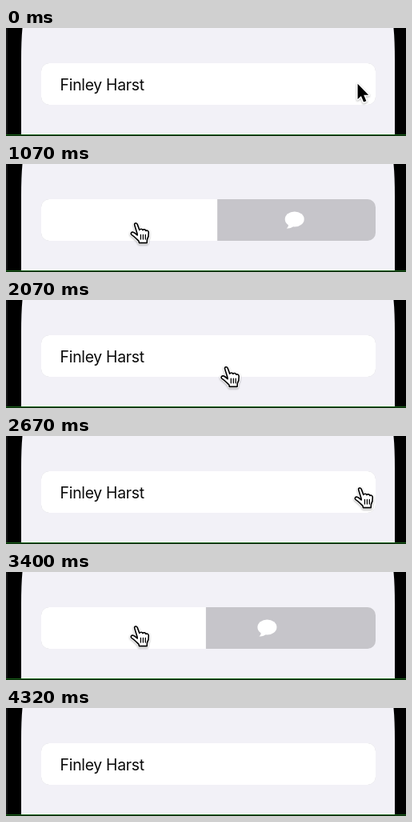
An HTML page that plays this animation: 500 px wide and 135 px high, repeating every 4440 ms.

```html
<!DOCTYPE html>
<html lang="en">
<head>
<meta charset="utf-8">
<title>Swipe action</title>
<style>
  html, body { margin: 0; width: 100%; height: 100%; overflow: hidden; background: #f2f1f7; }
  svg { display: block; width: 500px; height: 135px; }
  text { font: 400 19.4px Inter, "Liberation Sans", sans-serif; letter-spacing: -.3px; fill: #0a0a0a; }
  .halo { fill: none; stroke: #fff; stroke-linejoin: round; }
  .ink { fill: #fff; stroke: #000; stroke-width: 1.6; stroke-linejoin: round; stroke-linecap: round; }
  .creases { stroke-width: 1.3; }
  #cursor { filter: drop-shadow(0 1px 1px rgba(0, 0, 0, .3)); }
</style>
</head>
<body>
<svg viewBox="0 0 500 135">
  <defs>
    <clipPath id="card"><rect x="44" y="44" width="418" height="52" rx="10"/></clipPath>
    <path id="handShape" d="M10 15 L6.8 4.8 C5.9 1.9 9.2 .9 10.3 3.6 L12.8 10.4 C13.5 9 16.2 8.8 17 10.6 C17.9 9.3 20.3 9.6 20.9 11.5 C22.2 10.6 24.3 11.4 24.3 13.8 C24.5 18 24 20 22.4 22.5 L22.2 26.6 H12.4 L12 24.3 C9.5 22.3 7 19 3.2 16.6 C1 15 2.9 12.5 5.5 13.4 C7.2 14 8.3 15.2 10.2 17 Z"/>
    <path id="arrowShape" d="M5.6 6.8 V26 L9.9 22 L13.1 29.6 L16.4 28.2 L13.2 20.8 H19.2 Z"/>
  </defs>

  <rect width="500" height="135" fill="#f2f1f7"/>
  <path d="M0 0H20.5Q19 16 19 40V135H0ZM500 0H484.5Q486 16 486 40V135H500Z"/>
  <rect width="2" height="135" fill="#161617"/>
  <rect y="133" width="500" height="1" fill="#1c661c"/>
  <rect y="134" width="500" height="1" fill="#062406"/>

  <g clip-path="url(#card)">
    <rect x="44" y="44" width="418" height="52" fill="#c6c5ca"/>
    <g id="icon" fill="#fff">
      <ellipse cy="-1" rx="12" ry="9.6"/>
      <path d="M-8 4 Q-7 8.5 -10 10.5 Q-4.5 11 -1 7.5 Z"/>
    </g>
    <g id="row">
      <rect x="44" y="44" width="418" height="52" fill="#fff"/>
      <text x="67.6" y="78">Finley Harst</text>
    </g>
  </g>

  <g id="cursor">
    <g id="hand">
      <use href="#handShape" class="halo" stroke-width="3.6"/>
      <use href="#handShape" class="ink"/>
      <path class="ink creases" d="M14.4 16.5v5.5M17.4 16.5v5.5M20.3 16.5v5.5"/>
    </g>
    <g id="arrow">
      <use href="#arrowShape" class="halo" stroke-width="3"/>
      <use href="#arrowShape"/>
    </g>
  </g>
</svg>
<script>
  const LOOP = 4440, STEP = 1000 / 15;
  const CARD_RIGHT = 462, HALF_BUTTON = 44;
  const FIRST = 321, BACK = 1810, SECOND = 2670, LIFT = 3540, GONE = 4000;
  const DRAG = 590, RELEASE = 660;
  const PEAK = 252, SPRING = .0101;

  const byId = id => document.getElementById(id);
  const [row, icon, cursor, hand, arrow] = ['row', 'icon', 'cursor', 'hand', 'arrow'].map(byId);

  // Smooth progress from 0 to 1 between two values
  function ease(value, from, to) {
    const p = Math.min(1, Math.max(0, (value - from) / (to - from)));
    return p * p * (3 - 2 * p);
  }

  // The row trails the pointer, then springs shut after its release.
  function travel(t) {
    const s = t - (t < SECOND ? FIRST : SECOND);
    if (s < RELEASE) return PEAK * ease(s, 60, 600);
    const k = SPRING * (s - RELEASE);
    const x = PEAK * (1 + k) * Math.exp(-k);
    return x < .5 ? 0 : x;
  }

  function pointer(t) {
    const first = ease(t, FIRST, FIRST + DRAG);
    const back = ease(t, BACK, BACK + DRAG);
    const second = ease(t, SECOND, SECOND + DRAG);
    const lift = ease(t, LIFT, GONE);
    return {
      x: 447 - 280 * (first - back + second) - 6 * lift,
      y: 77 + 9 * (first - back) + 14 * Math.sin(Math.PI * back) + 3 * second - 46 * lift
    };
  }

  const move = (node, x, y) => node.setAttribute('transform', `translate(${x.toFixed(2)} ${y.toFixed(2)})`);
  const show = (node, on) => node.setAttribute('visibility', on ? 'visible' : 'hidden');

  function draw(t) {
    const w = travel(t);
    move(row, -w, 0);

    // The icon keeps to the right, then slides to the left end on a full swipe.
    const toLeft = ease(w, 149, 244);
    const inset = Math.min(HALF_BUTTON, w - HALF_BUTTON);
    move(icon, CARD_RIGHT - inset - toLeft * (w - 2 * HALF_BUTTON), 70);

    const { x, y } = pointer(t);
    const visible = t < GONE, isArrow = t < 260 || y < 57;
    move(cursor, x - 13, y - 14);
    show(hand, visible && !isArrow);
    show(arrow, visible && isArrow);
  }

  const start = performance.now();
  function tick() {
    const t = (performance.now() - start) % LOOP;
    draw(Math.floor((t + 4) / STEP) * STEP);
    requestAnimationFrame(tick);
  }
  tick();
</script>
</body>
</html>
```
